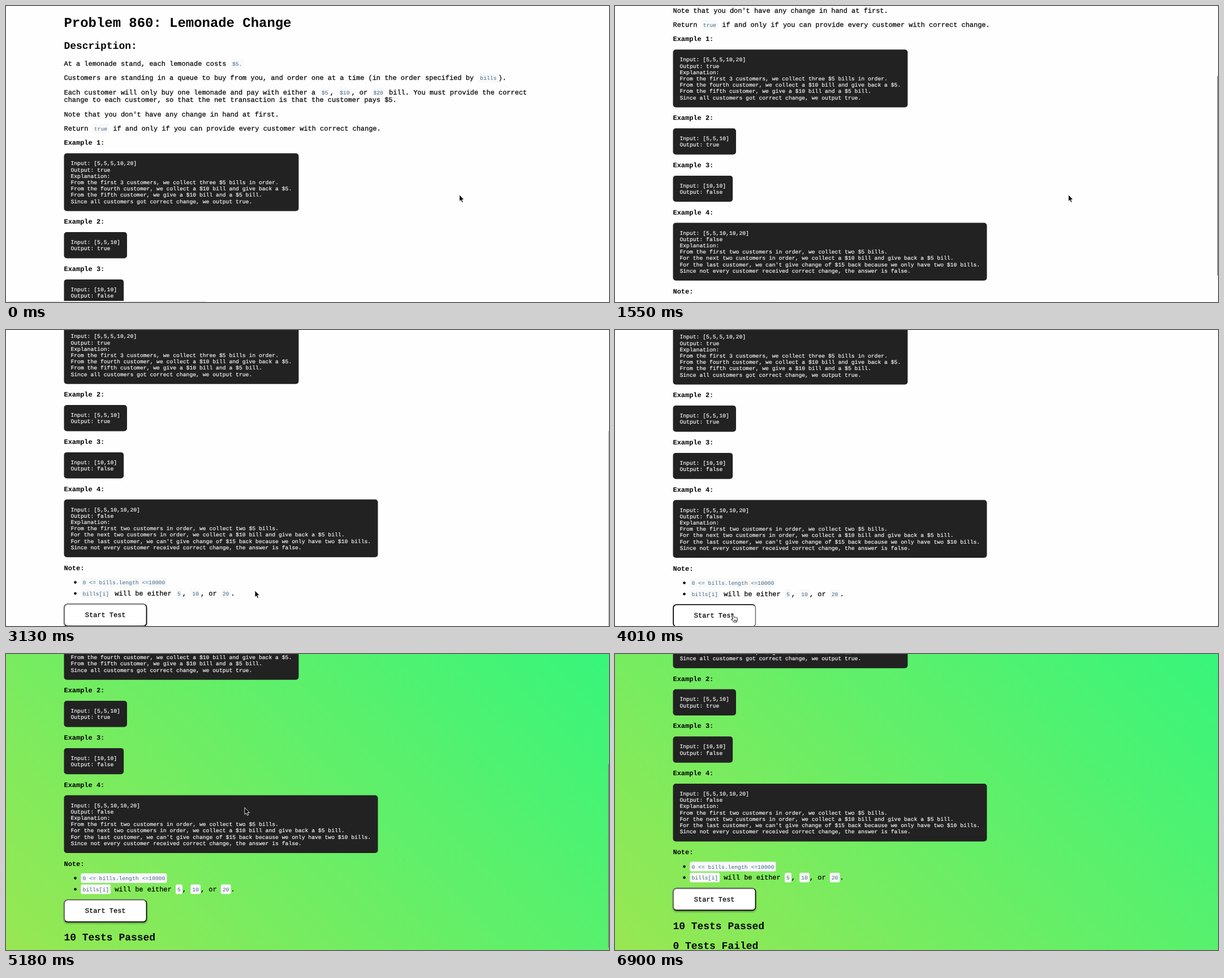
These frames come from a looping animation (1066 px wide and 525 px high, 7290 ms). An HTML page:

```html
<!DOCTYPE html>
<html lang="en">
<head>
<meta charset="utf-8">
<title>Lemonade Change</title>
<style>
html, body { margin: 0; width: 100%; height: 100%; overflow: hidden; background: #fefefe; }
svg { display: block; width: 100vw; height: 100vh; }
#stage.passed { background: linear-gradient(45deg, #98e752, #37f57b); }
text { font-family: "Liberation Mono", "Courier New", monospace; white-space: pre; text-rendering: geometricPrecision; }
.body { stroke: #000; stroke-width: .25px; }
.code { fill: #fff; stroke: #fff; stroke-width: .15px; }
.chip { fill: #476582; }
.bold { font-weight: 700; }
</style>
</head>
<body>
<svg id="stage" viewBox="0 0 1066 525">
  <defs>
    <filter id="shade" x="-10%" y="-20%" width="120%" height="160%">
      <feDropShadow dx="0" dy="2" stdDeviation="1.5" flood-color="#000" flood-opacity=".4"/>
    </filter>
  </defs>
  <g id="page"></g>
  <path id="bubble" d="M0 523H350Q355 523 356 525H0Z" fill="#ececec"/>
  <rect id="bar" x="1064.7" width="1.3" rx=".6" fill="#7c7c7c"/>
  <path id="arrow" d="M0 0V12L2.7 9.6L4.6 13.8L6.6 12.9L4.8 8.8H8.4Z" fill="#000" stroke="#fff" stroke-width=".9" stroke-linejoin="round"/>
  <path id="hand" d="M2.3 .9Q3.6 .2 4.3 1.4L5.7 4.9Q6.6 4 7.5 4.8Q8.5 4.1 9.2 5Q10.5 4.5 11 5.8L11.5 8.5Q11.6 10.2 10.6 11.3L10.3 13H4.6L4.2 11.8L.9 8.9Q.2 7.9 1.2 7.4Q2 7.2 3.1 8.1L3.6 8L1.7 2.3Q1.5 1.3 2.3 .9ZM6 9V11.2M7.7 9V11.2M9.3 9V11.2" fill="#fff" stroke="#000" stroke-width=".95" stroke-linejoin="round"/>
</svg>
<script>
const NS = "http://www.w3.org/2000/svg";
const LOOP = 7290;
const ZOOM = 0.748;
const LEFT = 102.5;
const BODY = 16 * ZOOM, SMALL = 13 * ZOOM;
const LINE = 15 * ZOOM, PAD = 16 * ZOOM;
const CHAR = 0.6001;
const $ = id => document.getElementById(id);
const page = $("page");

function add(tag, attrs, content = "") {
  const el = document.createElementNS(NS, tag);
  for (const key in attrs) el.setAttribute(key, attrs[key]);
  el.textContent = content;
  page.appendChild(el);
  return el;
}

function label(x, y, size, cls, content) {
  add("text", { x, y, "font-size": size, class: cls }, content);
  return content.length * size * CHAR;
}

const heading = (y, size, content) => label(LEFT, y, size * ZOOM, "bold", content);

// Backticks mark inline code.
function line(y, source, x = LEFT) {
  source.split("`").forEach((part, i) => {
    if (!part) return;
    if (i % 2 === 0) {
      x += label(x, y, BODY, "body", part);
      return;
    }
    const width = part.length * SMALL * CHAR + 6;
    add("rect", { x, y: y - 12.2, width, height: 17, rx: 2.3, fill: "#f7f9fa" });
    label(x + 3, y, SMALL, "chip", part);
    x += width;
  });
}

function block(y, lines) {
  const longest = Math.max(...lines.map(l => l.length));
  add("rect", {
    x: LEFT, y, rx: 5, fill: "#222",
    width: longest * SMALL * CHAR + 2 * PAD,
    height: lines.length * LINE + 2 * PAD
  });
  lines.forEach((l, i) => label(LEFT + PAD, y + 21 + i * LINE, SMALL, "code", l));
}

function item(y, source) {
  add("circle", { cx: 122.5, cy: y - 3.7, r: 2.3 });
  line(y, source, LEFT + 40 * ZOOM);
}

heading(37, 32, "Problem 860: Lemonade Change");
heading(75.5, 24, "Description:");
line(105.8, "At a lemonade stand, each lemonade costs `$5.`");
line(131.2, "Customers are standing in a queue to buy from you, and order one at a time (in the order specified by `bills`).");
line(156.7, "Each customer will only buy one lemonade and pay with either a `$5`, `$10`, or `$20` bill. You must provide the correct");
line(170.1, "change to each customer, so that the net transaction is that the customer pays $5.");
line(195.5, "Note that you don't have any change in hand at first.");
line(221, "Return `true` if and only if you can provide every customer with correct change.");
heading(246.4, 16, "Example 1:");
block(261.3, [
  "Input: [5,5,5,10,20]",
  "Output: true",
  "Explanation:",
  "From the first 3 customers, we collect three $5 bills in order.",
  "From the fourth customer, we collect a $10 bill and give back a $5.",
  "From the fifth customer, we give a $10 bill and a $5 bill.",
  "Since all customers got correct change, we output true."
]);
heading(386.3, 16, "Example 2:");
block(401.1, ["Input: [5,5,10]", "Output: true"]);
heading(470.1, 16, "Example 3:");
block(484.9, ["Input: [10,10]", "Output: false"]);
heading(553.9, 16, "Example 4:");
block(568.6, [
  "Input: [5,5,10,10,20]",
  "Output: false",
  "Explanation:",
  "From the first two customers in order, we collect two $5 bills.",
  "For the next two customers in order, we collect a $10 bill and give back a $5 bill.",
  "For the last customer, we can't give change of $15 back because we only have two $10 bills.",
  "Since not every customer received correct change, the answer is false."
]);
heading(693.9, 16, "Note:");
item(719.3, "`0 <= bills.length <=10000`");
item(738.9, "`bills[i]` will be either `5`, `10`, or `20`.");

const face = add("rect", { x: 103.2, y: 754.2, width: 145.2, height: 38.8, rx: 5.5, fill: "#fff", "stroke-width": 1.6 });
const edge = add("path", { d: "M104.8 791.4Q103.2 789.8 103.2 787.5V759.7Q103.2 754.2 108.7 754.2H242.9Q245.2 754.2 246.8 755.8", fill: "none", "stroke-width": 1.6 });
label(139.8, 777.4, BODY, "body", "Start Test");

const results = [
  [826.4, "10 Tests Passed"],
  [862, "0 Tests Failed"]
];
results.forEach(([y, content]) => heading(y, 24, content));

// Each row: start time, then the values held until the next row.
const scrolls = [
  [0, 0], [840, 70], [1220, 142], [1550, 184], [1820, 185], [2060, 186],
  [2350, 259.5], [2620, 268], [2860, 271], [3130, 268], [3370, 267],
  [5180, 318], [5420, 346], [5690, 343], [6070, 339.5], [6340, 338.6]
];
const pointers = [
  [0, "arrow", 801.5, 334.7], [2860, "arrow", 655, 395], [3130, "arrow", 440, 462],
  [3370, "arrow", 298, 499.5], [3610, "hand", 206, 505], [3840, "hand", 205, 505],
  [4370, "hand", 205, 504.3], [4670, "arrow", 422, 272.5], [6070, "arrow", 640, 356],
  [6340, "arrow", 859.5, 440.5], [6610, "arrow", 930.5, 483.5], [6900, "none", 0, 0]
];
const bars = [[0, 0], [840, 1], [3130, .5], [3370, 0], [5180, 1], [6070, 0]];
const held = (rows, t) => rows.filter(row => row[0] <= t).pop().slice(1);

function draw(t) {
  const passed = t >= 4190;
  const pressed = t >= 4010 && !passed;
  $("stage").classList.toggle("passed", passed);

  const [scroll] = held(scrolls, t);
  page.setAttribute("transform", `translate(0 ${-scroll})`);

  face.setAttribute("stroke", pressed ? "#767676" : "#000");
  edge.setAttribute("stroke", pressed ? "#000" : "#767676");
  face.setAttribute("filter", pressed ? "none" : "url(#shade)");

  const maxScroll = passed ? 338.6 : 267;
  const ratio = 525 / (525 + maxScroll);
  const bar = $("bar");
  bar.setAttribute("y", 2 + Math.min(scroll, maxScroll) * ratio);
  bar.setAttribute("height", 525 * ratio + 6);
  bar.setAttribute("opacity", held(bars, t)[0]);

  const [kind, x, y] = held(pointers, t);
  for (const name of ["arrow", "hand"]) {
    $(name).setAttribute("visibility", name === kind ? "visible" : "hidden");
    $(name).setAttribute("transform", `translate(${x} ${y})`);
  }
  $("bubble").setAttribute("opacity", t < 240 ? 1 : t < 840 ? .8 : 0);
}

const start = performance.now();
function tick() {
  draw((performance.now() - start) % LOOP);
  requestAnimationFrame(tick);
}
tick();
</script>
</body>
</html>
```
